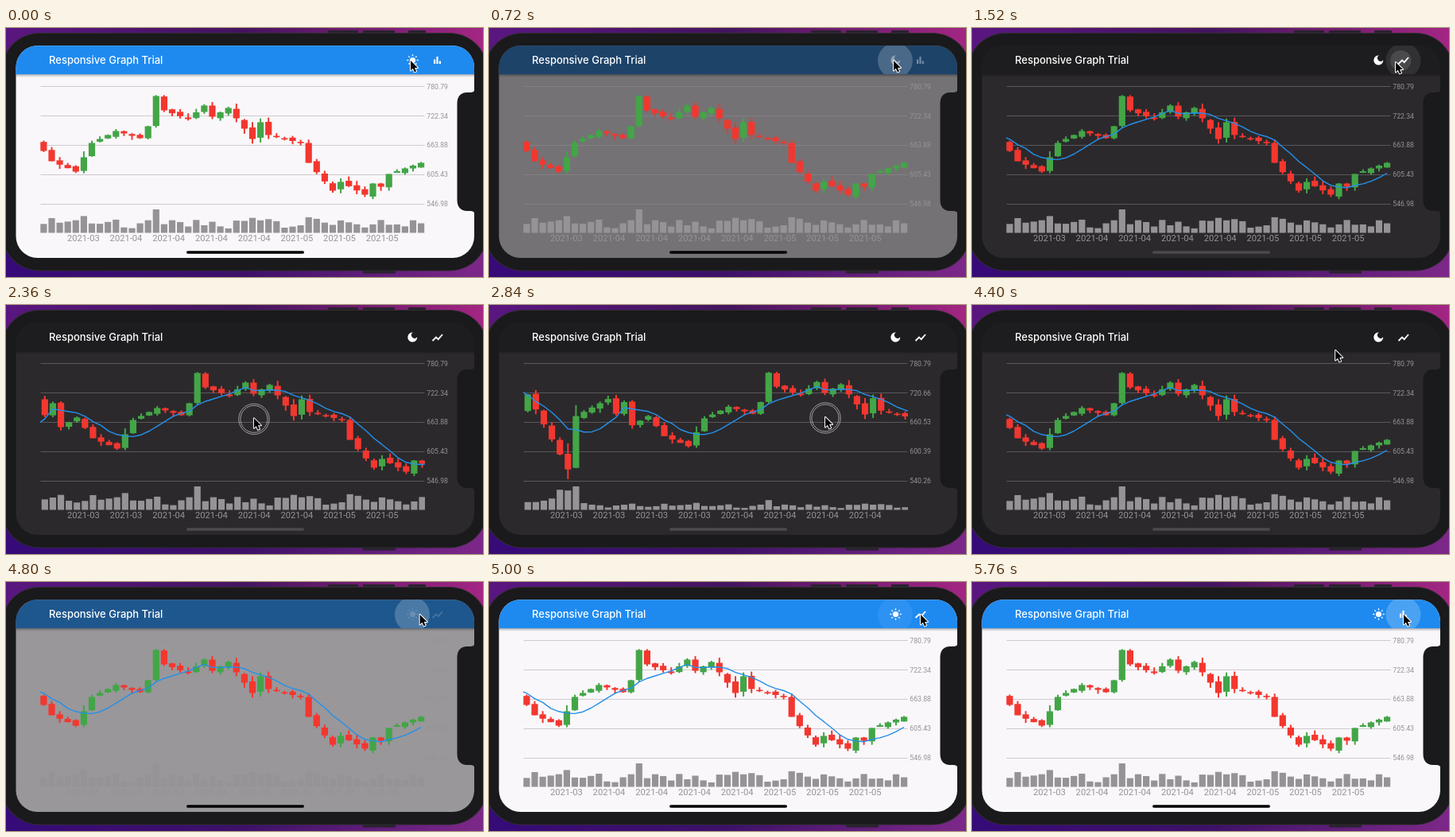
An HTML page with a canvas for the animation above (5800 ms loop, 600x313 px).

```html
<!DOCTYPE html>
<html lang="en">
<head>
<meta charset="utf-8">
<title>Stock chart</title>
<style>
  html, body { margin: 0; width: 100%; height: 100%; overflow: hidden; background: #1b1a1c; }
  canvas { display: block; width: 600px; height: 313px; }
</style>
</head>
<body>
<canvas id="stage"></canvas>
<script>
const LOOP = 5800, DAYS = 64, VISIBLE = 48, STEP = 10.1, FIRST = 47.4;
const LEFT = 43.5, RIGHT = 527, TOP = 73.5, BASE = 257.5;
const GREY = '#959395', GREEN = '#43a547', RED = '#f2372f', FRAME = '#1a191b';

const canvas = document.getElementById('stage');
const c = canvas.getContext('2d');
const dpr = window.devicePixelRatio || 1;
canvas.width = 600 * dpr;
canvas.height = 313 * dpr;

const clamp = (v, a = 0, b = 1) => Math.min(b, Math.max(a, v));
const lerp = (a, b, p) => a + (b - a) * p;
const ramp = (t, a, b) => clamp((t - a) / (b - a));
const smooth = p => p * p * (3 - 2 * p);
const mix = (a, b, p) => `rgb(${a.map((v, i) => Math.round(lerp(v, b[i], p)))})`;
const range = (n, f) => Array.from({ length: n }, (_, i) => f(i));
const rand = n => {
  const v = Math.sin(n * 12.9898 + 4.1) * 43758.5453;
  return v - Math.floor(v);
};

// Turning points of the closing price: day, depth in pixels below the highest price
const turns = [[-7, 0], [-6, 0], [-5, 36], [-1, 62], [0, 40], [5, 137], [6, 68], [10, 46],
  [11, 65], [12, 50], [13, 80], [15, 68], [17, 94], [20, 107], [22, 71], [25, 56], [28, 65],
  [29, 50], [30, 12], [31, 30], [34, 41], [36, 24], [37, 38], [39, 27], [42, 66], [43, 45],
  [44, 61], [48, 71], [49, 96], [52, 131], [53, 120], [56, 136], [57, 122], [58, 126],
  [59, 110], [63, 96]];

function closeAt(day) {
  const i = Math.max(1, turns.findIndex(p => p[0] >= day));
  const [a, b] = [turns[i - 1], turns[i]];
  return lerp(a[1], b[1], ramp(day, a[0], b[0]));
}

// Busy days have large moves and long wicks; one early week is exceptionally busy.
const candles = range(DAYS, day => {
  const close = closeAt(day), last = closeAt(day - 1);
  const open = last + (rand(day) - 0.5) * 5;
  const surge = 42 * Math.exp(-(((day - 4.8) / 2) ** 2));
  const volume = 3 + 10 * rand(day + 0.2) + 0.35 * Math.abs(close - last) + surge;
  const wick = 4 + volume * 0.2;
  return {
    open, close, volume,
    high: Math.max(0, Math.min(open, close) - wick * rand(day + 0.4)),
    low: Math.max(open, close) + wick * rand(day + 0.6),
  };
});
const trend = range(DAYS + 1, i =>
  range(7, k => closeAt(i - 1 - k)).reduce((a, b) => a + b) / 7);
const busiest = list => Math.max(...list.map(k => k.volume));
const volumeEnd = busiest(candles.slice(-VISIBLE)), volumeAll = busiest(candles);

// Cursor moves: start, end, x, y
const moves = [[860, 1420, 533, 43], [1620, 2040, 260, 143], [2120, 2760, 423, 141],
  [3060, 3480, 162, 145], [3980, 4540, 511, 41], [4710, 4960, 543, 41]];

function cursorAt(t) {
  return moves.reduce(([x, y], [start, end, nx, ny]) => {
    const p = smooth(ramp(t, start, end));
    return [lerp(x, nx, p), lerp(y, ny, p)];
  }, [509, 41]);
}

function rect(x, y, w, h, fill) {
  c.fillStyle = fill;
  c.fillRect(x, y, w, h);
}
function round(x, y, w, h, r, fill) {
  c.beginPath();
  c.roundRect(x, y, w, h, r);
  c.fillStyle = fill;
  c.fill();
}
function disc(x, y, r, fill) {
  c.beginPath();
  c.arc(x, y, r, 0, 7);
  c.fillStyle = fill;
  c.fill();
}
function line(points, color, width) {
  c.beginPath();
  points.forEach(([x, y]) => c.lineTo(x, y));
  c.strokeStyle = color;
  c.lineWidth = width;
  c.stroke();
}
function text(str, x, y, font, fill, align = 'left') {
  c.font = font;
  c.textAlign = align;
  c.fillStyle = fill;
  c.fillText(str, x, y);
}
function sky(y, colors) {
  const g = c.createLinearGradient(0, 0, 600, 0);
  colors.forEach((color, i) => g.addColorStop(i / (colors.length - 1), color));
  rect(0, y, 600, 157, g);
}

function drawPhone() {
  sky(0, ['#5a1680', '#43145f', '#a32683']);
  sky(156, ['#360a78', '#3d1168', '#7d2889']);
  [[405, 3, 38], [449, 3, 40], [506, 3, 22], [449, 303, 41]].forEach(([x, y, w]) =>
    round(x, y, w, 5.5, 1, '#29222e'));
  round(-6, 6, 612, 299.5, 48, '#302d31');
  round(-5, 7, 610, 297.5, 47, FRAME);
}

function drawNotch() {
  c.beginPath();
  c.moveTo(590, 77);
  c.quadraticCurveTo(589, 81, 584, 81);
  c.lineTo(580, 81);
  c.quadraticCurveTo(567.5, 81.5, 567.5, 95);
  c.lineTo(567.5, 216);
  c.quadraticCurveTo(567.5, 229.5, 580, 230);
  c.lineTo(584, 230);
  c.quadraticCurveTo(589, 230, 590, 234);
  c.fillStyle = FRAME;
  c.fill();
}

function ripple(t, press, x, fromX) {
  const dt = t - press;
  if (dt < 0 || dt > 460) return;
  const fade = 1 - ramp(dt, 200, 460), grow = ramp(dt, 0, 160);
  c.save();
  c.beginPath();
  c.rect(0, 22, 600, 36);
  c.clip();
  disc(x, 41, 22, `rgba(255,255,255,${0.09 * fade * ramp(dt, 0, 60)})`);
  disc(lerp(fromX, x, grow), 41, 4 + 18 * grow, `rgba(255,255,255,${0.12 * fade})`);
  c.restore();
}

function drawIcons(isDark, hasTrend, alpha) {
  const white = '#fff';
  c.save();
  c.globalAlpha = alpha;
  if (isDark) {
    c.beginPath();
    c.arc(511.3, 40.5, 6, -1.4, 0.1, true);
    c.arc(514, 37.8, 4, 0.75, -2.4);
    c.closePath();
    c.fillStyle = white;
    c.fill();
  } else {
    disc(511.5, 40.5, 3.6, white);
    for (let i = 0; i < 8; i++) {
      const dx = Math.cos(i * Math.PI / 4), dy = Math.sin(i * Math.PI / 4);
      line([5.2, 7.2].map(r => [511.5 + dx * r, 40.5 + dy * r]), white, 1.4);
    }
  }
  if (hasTrend) {
    line([[536.5, 45], [541, 40.5], [543.7, 43.2], [549, 37]], white, 1.8);
  } else {
    [[538, 39.5], [541.4, 36], [544.8, 41.5]].forEach(([x, y]) => rect(x, y, 2.2, 45 - y, white));
  }
  c.restore();
}

function drawChart(shift, wide, hasTrend) {
  const scale = 147.5 / lerp(147.5, 151.8, wide);
  const volumeScale = 29.5 / lerp(volumeEnd, volumeAll, wide);
  const span = lerp(233.812, 240.528, wide);
  const hidden = DAYS - VISIBLE;
  const xOf = day => FIRST + (day - hidden) * STEP + shift;
  const yOf = v => TOP + v * scale;

  for (let i = 0; i < 5; i++) {
    const y = TOP + i * 36.875;
    c.globalAlpha = 0.44;
    rect(LEFT, Math.floor(y), RIGHT - LEFT - 0.5, 1, GREY);
    c.globalAlpha = 1;
    text((780.79 - span * i / 4).toFixed(2), 529.3, y + 3.2, '8.7px Roboto, sans-serif', GREY);
  }
  for (let i = 0; i < 8; i++) {
    const x = 97.3 + i * 53.7;
    const day = Math.round((x - shift - FIRST) / STEP) + hidden;
    const month = day < 23 ? 3 : day < 44 ? 4 : 5;
    text('2021-0' + month, x, 268, '11.2px Roboto, sans-serif', GREY, 'center');
  }

  c.save();
  c.beginPath();
  c.rect(LEFT - 0.5, 60, RIGHT - LEFT + 0.5, 200);
  c.clip();
  candles.forEach(({ open, close, high, low, volume }, day) => {
    const x = xOf(day), color = close < open ? GREEN : RED;
    const h = volume * volumeScale;
    const body = Math.max(1.6, Math.abs(close - open) * scale);
    rect(x - 4.1, BASE - h, 8.2, h, GREY);
    rect(x - 1, yOf(high), 2, (low - high) * scale, color);
    rect(x - 4.1, yOf((open + close) / 2) - body / 2, 8.2, body, color);
  });
  c.lineJoin = 'round';
  if (hasTrend) line(trend.map((v, i) => [xOf(i - 1), yOf(v)]), '#2490ea', 1.4);
  c.restore();
}

function drawCursor(x, y, pressed) {
  if (pressed) {
    c.strokeStyle = 'rgba(255,255,255,.6)';
    c.lineWidth = 0.9;
    [17, 19.2].forEach(r => {
      c.beginPath();
      c.arc(x, y + 1, r, 0, 7);
      c.stroke();
    });
  }
  c.save();
  c.translate(x, y);
  c.beginPath();
  [[0, 0], [0, 12.5], [2.9, 9.8], [4.9, 14.4], [7, 13.5], [5.1, 9], [9, 9]]
    .forEach(([px, py]) => c.lineTo(px, py));
  c.closePath();
  c.lineJoin = 'round';
  c.strokeStyle = '#fff';
  c.lineWidth = 2;
  c.stroke();
  c.fillStyle = '#000';
  c.fill();
  c.restore();
}

function draw(t) {
  const dark = ramp(t, 592, 792) - ramp(t, 4694, 4894);
  const isDark = t >= 592 && t < 4694;
  const hasTrend = t >= 1500 && t < 5650;
  const pressed = t >= 2090 && t < 3500;
  const [x, y] = cursorAt(t);
  const shift = pressed ? clamp(x - 260, 0, 163) : 0;
  const wide = smooth(ramp(t, 2480, 2800)) - smooth(ramp(t, 3230, 3556));

  c.setTransform(dpr, 0, 0, dpr, 0, 0);
  drawPhone();

  c.save();
  c.beginPath();
  c.roundRect(12.5, 22.3, 576.5, 266.7, 27);
  c.clip();
  rect(0, 0, 600, 313, mix([249, 247, 250], [43, 41, 44], dark));
  const shade = c.createLinearGradient(0, 58, 0, 62);
  shade.addColorStop(0, 'rgba(0,0,0,.3)');
  shade.addColorStop(1, 'rgba(0,0,0,0)');
  rect(0, 58, 600, 4, shade);
  rect(0, 0, 600, 58.2, mix([30, 138, 240], [29, 28, 30], dark));
  text('Responsive Graph Trial', 54, 45, '500 13px Inter, sans-serif', '#fff');
  ripple(t, 545, 511, 510);
  ripple(t, 1440, 542.5, 536);
  ripple(t, 4630, 511, 511);
  ripple(t, 5590, 542.5, 543);
  drawIcons(isDark, hasTrend, clamp(Math.abs(2 * dark - 1) + 0.1));
  drawChart(shift, wide, hasTrend);
  const dim = ramp(t, 700, 1000) - ramp(t, 4640, 4760);
  round(227, 280.2, 148, 3.6, 1.8, mix([0, 0, 0], [76, 74, 77], dim));
  c.restore();

  drawNotch();
  drawCursor(x, y, pressed);
}

const begin = performance.now();
function frame() {
  draw((performance.now() - begin) % LOOP);
  requestAnimationFrame(frame);
}
frame();
</script>
</body>
</html>
```
